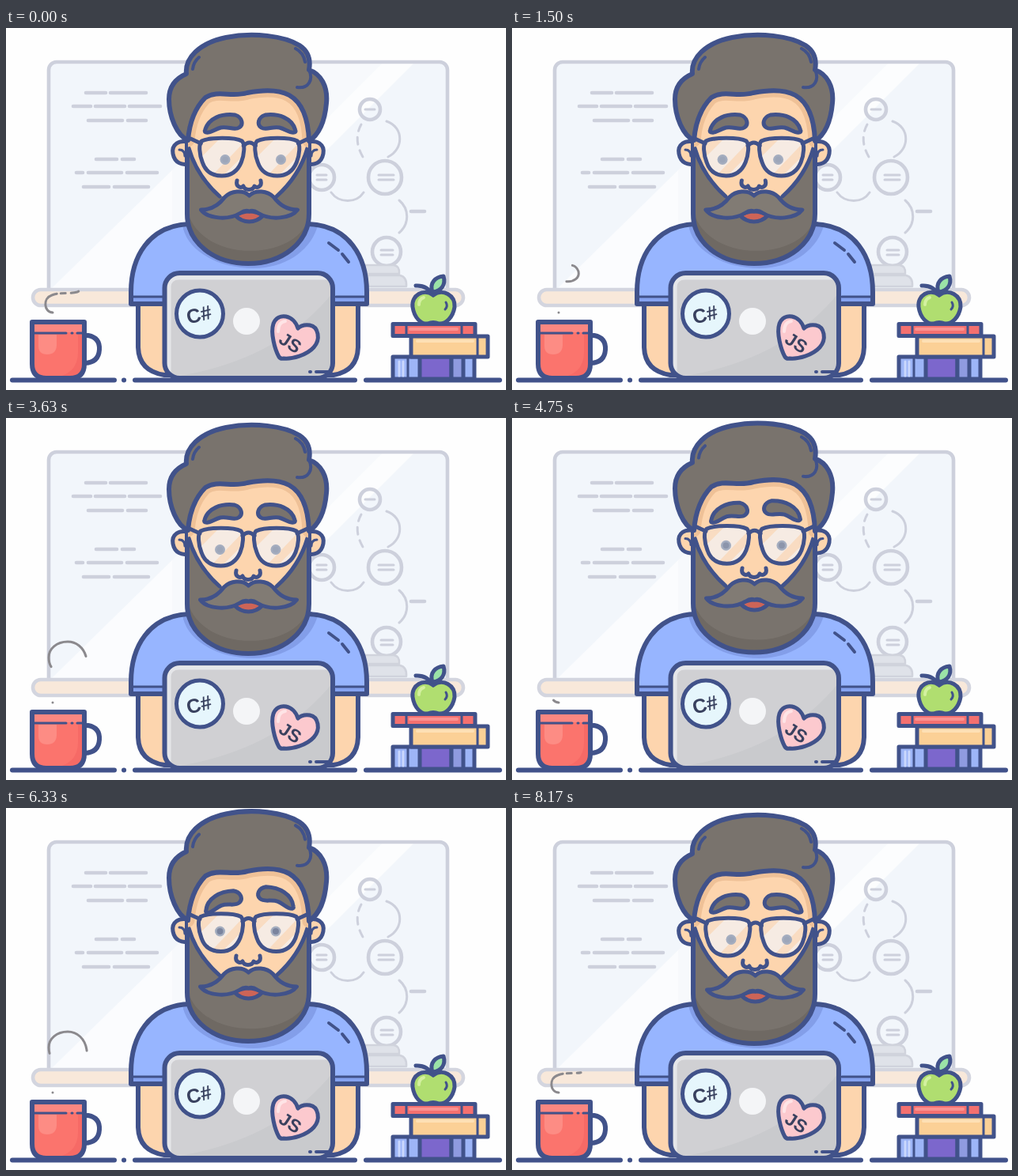
Write an HTML page that moves like this. It is 632 px wide and 458 px high and loops after 8.21 s.

```html
<!DOCTYPE html>
<html lang="en">
<head>
<meta charset="utf-8">
<title>Developer at a desk</title>
<style>
  html, body { margin: 0; width: 100%; height: 100%; overflow: hidden; background: #fefefe; }
  svg { display: block; width: 632px; height: 458px; }
  path, line, rect, circle, ellipse { stroke-linecap: round; stroke-linejoin: round; }
  .ink { stroke: #41528a; stroke-width: 6; }
  .mid { stroke: #41528a; stroke-width: 5; }
  .thin { stroke: #41528a; stroke-width: 4; fill: none; }
  .none { fill: none; }
  .chalk { stroke: #cdd0dc; stroke-width: 4.6; fill: none; }
  .fine { stroke: #cdd0dc; stroke-width: 3; fill: none; }
  .skin { fill: #fdd5ae; }
  .hair { fill: #79736d; }
  text { font: bold 25px "Liberation Sans", Arial, sans-serif; fill: #39415f; text-anchor: middle; }
</style>
</head>
<body>
<svg viewBox="0 0 632 458">
  <defs>
    <clipPath id="boardClip"><rect x="54" y="43" width="504" height="290" rx="10"/></clipPath>
    <clipPath id="shirtClip"><path id="shirtShape" d="M158 349V334C158 290 180 250 232 248H382C434 250 456 290 456 334V349Z"/></clipPath>
    <clipPath id="lidClip"><rect id="lid" x="200.500" y="310" width="212.500" height="133" rx="19"/></clipPath>
    <clipPath id="lensClip"><path id="lens" d="M246 143C256 138 288 138 297 143C301 147 300 160 296 170C291 182 282 187 271.500 187C260 187 251 182 247 170C243 160 242 147 246 143Z"/></clipPath>
    <clipPath id="hairClip"><use href="#hairShape"/></clipPath>
    <clipPath id="faceClip"><path id="face" d="M230 75H382V225H230Z"/></clipPath>
    <clipPath id="cupClip"><path id="cup" d="M33 372H99V425Q99 443 81 443H51Q33 443 33 425Z"/></clipPath>
    <clipPath id="beardClip"><use href="#beardShape"/></clipPath>
  </defs>

  <!-- board -->
  <g clip-path="url(#boardClip)">
    <rect x="54" y="43" width="504" height="290" fill="#f2f6fb"/>
    <path d="M347 43H477L187 333H57Z" fill="#f7f9fc"/>
    <path d="M477 43H517L227 333H187Z" fill="#fcfdfe"/>
    <path d="M54 333L210 180L210 333Z" fill="#fbfcfe"/>
  </g>
  <rect class="chalk" x="54" y="43" width="504" height="296" rx="10"/>
  <path class="chalk" d="M101 82H126M132 82H177M85 99H107M113 99H150M156 99H195M104 117H147M154 117H177M114 166H140M147 166H162M89 183H97M104 183H146M153 183H191M98 201H130M137 201H180"/>
  <g class="chalk">
    <circle cx="460" cy="103" r="13"/>
    <circle cx="479" cy="189" r="21"/>
    <circle cx="399" cy="189" r="16"/>
    <circle cx="481" cy="283" r="18"/>
    <path d="M512 232H529"/>
  </g>
  <path class="fine" d="M454 103H466M471 186H490M471 192H490M393 186H405M393 192H405M474 281H489M474 287H489M481 118C504 126 502 154 483 163M411 208C421 222 443 222 452 208M497 218C510 229 510 248 497 259"/>
  <path class="fine" stroke-dasharray="9 8" d="M449 122C441 136 443 153 455 169"/>
  <path d="M448 300H490Q498 301 497 311H448ZM448 313H498Q507 315 506 327H448Z" fill="#dfe2e9" stroke="#d0d3dc" stroke-width="2.500"/>
  <rect x="34" y="331" width="544" height="20" rx="10" fill="#f8e8da" stroke="#d3d5df" stroke-width="4.600"/>

  <g fill="none" stroke="#8b898d" stroke-width="3">
    <path class="steam"/><path class="steam"/>
  </g>

  <!-- arms and shirt -->
  <path class="ink skin" d="M167 346V404Q168 434 200 439H414Q444 434 445 404V346Z"/>
  <use href="#shirtShape" fill="#97b5ff"/>
  <g clip-path="url(#shirtClip)">
    <path d="M224 240V254C232 284 270 304 313 304C358 304 392 276 396 240Z" fill="#839ee9"/>
    <path d="M158 340H456V350H158Z" fill="#85a2f0"/>
  </g>
  <path d="M160 340H198M417 340H454" stroke="#41528a" stroke-width="3"/>
  <use href="#shirtShape" class="ink none"/>
  <path class="thin" d="M408 272L420 281M425 286L433 296"/>

  <!-- head -->
  <g id="ears">
    <g id="ear">
      <path class="mid skin" d="M233 145C218 140 209 148 211 159C213 170 222 175 233 171Z"/>
      <path d="M219 154Q226 154 226 162" class="none" stroke="#41528a" stroke-width="3"/>
    </g>
    <use href="#ear" transform="matrix(-1 0 0 1 612 0)"/>
  </g>
  <use href="#face" class="skin"/>
  <g id="beard">
    <path id="beardShape" class="hair" d="M229 145L237 165Q248 193 270 213H342Q364 193 375 165L383 145V235C383 272 349 298 306 298C263 298 229 272 229 235Z"/>
    <path clip-path="url(#beardClip)" d="M229 230C238 270 285 288 330 280C360 274 380 258 383 235V300H229Z" fill="#6f6963"/>
    <path class="none ink" d="M229 110V235C229 272 263 298 306 298C349 298 383 272 383 235V110"/>
    <path class="none mid" d="M231 152Q241 187 270 213M381 152Q371 187 342 213"/>
  </g>
  <g clip-path="url(#faceClip)">
    <use href="#hairShape" class="grow" fill="none" stroke="#efc197" stroke-width="17"/>
  </g>
  <g class="grow">
    <path id="hairShape" class="hair" d="M230 142C216 136 206 112 206 90C206 74 214 64 228 58C226 38 244 19 278 12C312 5 352 10 371 22C383 30 385 42 383 53C398 58 407 74 405 95C403 118 397 134 383 143C382 115 374 94 358 85C345 78 325 78 305 82C285 88 268 78 252 88C240 100 232 118 230 142Z"/>
    <g clip-path="url(#hairClip)">
      <path d="M222 58C230 5 330 -2 325 32C321 58 280 74 225 61Z" fill="#837d77"/>
      <path d="M340 73C365 75 380 70 385 55L407 70V130L384 142C381 105 370 89 340 73Z" fill="#6e6862"/>
    </g>
    <use href="#hairShape" class="ink none"/>
    <path class="thin" d="M236 52Q237 43 244 37M366 26Q376 31 378 43M383 53C389 66 382 77 368 75"/>
  </g>

  <g id="brows">
    <g id="browL"><path id="brow" class="hair mid" d="M251 129C255 114 272 108 289 110C298 113 300 122 294 126C288 130 280 124 271 126C263 128 257 134 252 132Q250 131 251 129Z"/></g>
    <g transform="matrix(-1 0 0 1 616 0)"><g id="browR"><use href="#brow"/></g></g>
  </g>

  <g id="glasses">
    <g id="glass">
      <use href="#lens" fill="#f6ebe3"/>
      <path clip-path="url(#lensClip)" d="M240 138H271L240 169ZM302 142L256 190H270L304 156Z" fill="#f9dcc2"/>
    </g>
    <use href="#glass" x="70"/>
  </g>
  <g id="pupils">
    <circle cx="270.500" cy="166.500" r="6.500" fill="#a4adbf"/>
    <circle cx="341" cy="166.500" r="6.500" fill="#a4adbf"/>
    <g class="dark" fill="#7b849e"><circle cx="270.500" cy="166.500" r="4"/><circle cx="341" cy="166.500" r="4"/></g>
  </g>
  <g id="frames" class="none mid">
    <use href="#lens"/><use href="#lens" x="70"/>
    <path d="M299 149Q306.500 141 314 149M245 146L232 140M368 146L381 140"/>
  </g>
  <path id="nose" class="none mid" d="M292 193C290 201 297 203 300 200C302 206 312 206 314 200C317 203 324 201 322 193"/>
  <g id="mouth">
    <path class="mid" fill="#cd6457" d="M289 237Q307 227 325 237Q317 245 307 245Q297 245 289 237Z"/>
    <path class="mid" fill="#817b74" d="M307 212C299 204 284 206 276 214C268 225 258 230 246 230C254 241 280 244 296 234Q302 230 307 232Q312 230 318 234C334 244 360 241 368 230C356 230 346 225 338 214C330 206 315 204 307 212Z"/>
  </g>

  <!-- desk line -->
  <path class="ink" d="M8 445.500H137M149 445.500H149.100M163 445.500H441M455 445.500H624"/>

  <!-- laptop -->
  <g clip-path="url(#lidClip)">
    <use href="#lid" fill="#d0d0d3"/>
    <path d="M200 443Q340 425 413 335V443Z" fill="#c9cacd"/>
    <path d="M206 443V328Q206 316 219 316H413" fill="none" stroke="#e5e6e9" stroke-width="5"/>
  </g>
  <use href="#lid" class="ink none"/>
  <path class="thin" d="M384 435H385M392 435H408"/>
  <circle cx="304" cy="371" r="17" fill="#f4f5f7"/>
  <circle class="mid" cx="245" cy="361.500" r="29.500" fill="#e6f6fc"/>
  <text transform="translate(246 371) rotate(-14)">C#</text>
  <path class="mid" fill="#fcc9ce" d="M369 380C364 363 344 359 338 374C334 386 340 407 345 416Q347 419 351 418C362 419 380 414 389 404C398 394 395 378 384 376C377 375 372 377 369 380Z"/>
  <path d="M344 384Q344 372 353 371" fill="none" stroke="#fee4e6" stroke-width="4"/>
  <text transform="translate(355 405) rotate(33)" style="font-size:23px">JS</text>

  <!-- mug -->
  <path class="ink none" d="M99 389H104Q119 392 118 407Q117 423 100 424"/>
  <g clip-path="url(#cupClip)">
    <rect x="33" y="372" width="66" height="71" fill="#fb746d"/>
    <path d="M41 388H64V402Q63 413 52 413Q41 413 41 402Z" fill="#fd8c84"/>
    <rect x="33" y="372" width="66" height="13" fill="#fb8781"/>
    <path d="M91 388H99V443H56Q91 440 91 410Z" fill="#f66a66"/>
  </g>
  <use href="#cup" class="ink none"/>
  <path class="thin" style="stroke-width:3" d="M36 386H76M83 386H84M90 386H97"/>

  <!-- books -->
  <g class="mid">
    <rect x="489" y="416" width="103" height="28" fill="#9db5f7"/>
    <path fill="#7c67cc" d="M523 416H563V444H523Z"/>
    <path fill="#8f9be0" d="M563 416H578V444H563Z"/>
    <rect x="512" y="390" width="97" height="26" fill="#fbd096"/>
    <rect x="489" y="374.500" width="104" height="15" fill="#f4706f"/>
  </g>
  <path d="M497 422V440M502 422V440" stroke="#cad7fd" stroke-width="3"/>
  <path class="thin" style="stroke-width:3" d="M508 418V442M596 392V414M506 377V387M576 377V387"/>
  <path d="M511 381H570" stroke="#fa9291" stroke-width="4"/>
  <path d="M520 396H590" stroke="#fee0b4" stroke-width="4"/>

  <!-- fruit -->
  <path class="mid" fill="#b0de70" d="M540 338C528 329 512 338 514 353C516 367 525 375 533 374Q540 371 547 374C556 375 565 366 567 353C568 338 552 329 540 338Z"/>
  <path d="M522 350Q522 343 528 341" fill="none" stroke="#d3f0a0" stroke-width="4"/>
  <path class="thin" style="stroke-width:3" d="M556 347Q559 352 555 356"/>
  <path class="mid none" d="M540 338Q532 325 518 326"/>
  <path class="mid" fill="#9be2a7" d="M539 334C535 322 543 315 553 314C556 324 551 333 539 334Z"/>
</svg>
<script>
const LOOP = 8210, PUFF = LOOP / 3, PUFF_START = 1706;
const $ = s => document.querySelector(s);
const smooth = u => u * u * (3 - 2 * u);

// Value at t in a table of [time, value] steps.
function at(steps, t, ease = u => u) {
  if (t <= steps[0][0]) return steps[0][1];
  for (let i = 1; i < steps.length; i++) {
    const [t0, a] = steps[i - 1], [t1, b] = steps[i];
    if (t <= t1) return a + (b - a) * ease((t - t0) / (t1 - t0));
  }
  return steps.at(-1)[1];
}

const gaze = [[0, 6.5], [500, 6.5], [1550, -4.5], [2600, -4.5], [3500, 0], [7230, 0], [8100, 6.5]];
const lift = [[4250, 0], [5250, 1], [7230, 1], [8100, 0]];
const head = [[0, 0], [500, 12], [730, 25], [1000, 61], [1450, 115], [1920, 178], [2400, 224], [2700, 230]];
const tail = [[1030, 0], [1300, 18], [1600, 52], [1920, 99], [2400, 180], [2767, 214], [2950, 232]];
const solid = [[0, 37], [42, 48], [55, 230]];

const puffs = document.querySelectorAll('.steam');
for (const p of puffs) {
  p.setAttribute('d', 'M59 360C48 360 46 342 58 338C68 334 80 337 90 334C100 330 103 317 102 306C100 292 90 283 78 283C64 283 54 292 54 303C54 313 59 319 65 320C76 323 86 317 84 308C82 302 78 300 73 300');
  p.setAttribute('pathLength', 230);
}

function drawPuff(path, age) {
  const from = at(tail, age), to = at(head, age);
  const dashes = [0];
  let pos = 0;
  for (const [a, b] of solid) {
    const s = Math.max(a, from), e = Math.min(b, to);
    if (e < s) continue;
    dashes.push(s - pos, e - s);
    pos = e;
  }
  path.style.display = dashes.length > 1 ? '' : 'none';
  path.setAttribute('stroke-dasharray', [...dashes, 500].join(' '));
}

const move = (id, x, y) => $(id).setAttribute('transform', `translate(${x} ${y})`);
const stretch = (el, y, s) => el.setAttribute('transform', `translate(0 ${y * (1 - s)}) scale(1 ${s})`);
const tilt = (id, angle, y) => $(id).setAttribute('transform', `translate(0 ${y}) rotate(${angle} 274 119)`);
const grow = document.querySelectorAll('.grow');

function draw(t) {
  const x = at(gaze, t, smooth), k = at(lift, t, smooth);
  for (const el of grow) stretch(el, 142, 1 + 0.034 * k);
  stretch($('#beard'), 150, 1 - 0.02 * k);
  move('#ears', 0, -3 * k);
  for (const id of ['#glasses', '#frames']) move(id, x * 0.2, -5.5 * k);
  move('#pupils', x, -10.5 * k);
  $('.dark').setAttribute('opacity', 0.15 + 0.85 * k);
  move('#nose', x * 0.15 - 1, -6 * k);
  move('#mouth', x * 0.15 - 0.5, -4 * k);
  move('#brows', x * 0.1, -3 * k);
  tilt('#browL', -9 * k, 0);
  tilt('#browR', -9 * k, -5 * k);

  const age = (t - PUFF_START + LOOP) % PUFF;
  drawPuff(puffs[0], age);
  drawPuff(puffs[1], age + PUFF);
}

const start = performance.now();
function tick(now) {
  draw(Math.max(0, now - start) % LOOP);
  requestAnimationFrame(tick);
}
draw(0);
requestAnimationFrame(tick);
</script>
</body>
</html>
```
